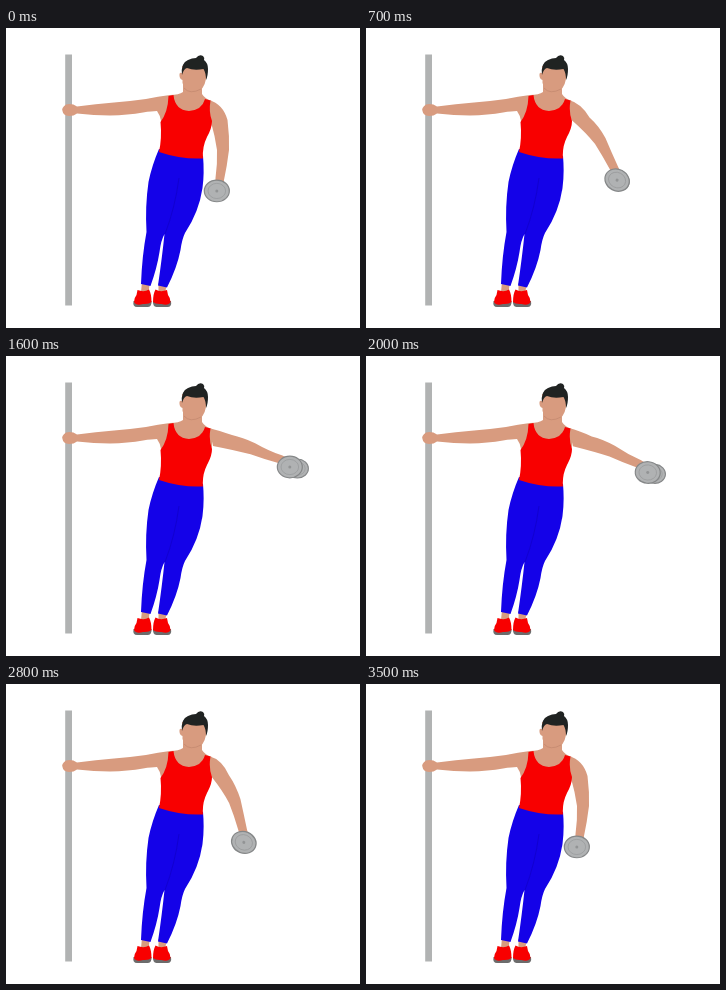
Recreate the animation shown at these times as an HTML page. Size 354 by 300 pixels, loop 3.6 s.

```html
<!DOCTYPE html>
<html lang="en">
<head>
<meta charset="utf-8">
<title>Side raise</title>
<style>
  html, body { margin: 0; width: 100%; height: 100%; overflow: hidden; background: #fff; }
  svg { display: block; width: 354px; height: 300px; }
  .skin { fill: #d89b7f; }
  .red { fill: #f80000; }
  .blue { fill: #1402e8; }
  .hair { fill: #202322; }
  .sole { fill: #6c6c6c; }
  .plate { fill: #b0b2b3; stroke: #858788; stroke-width: 1.2; }
  .ring { fill: none; stroke: #9a9c9d; stroke-width: .8; }
</style>
</head>
<body>
<svg viewBox="0 0 354 300">
  <defs>
    <g id="shoe">
      <path class="sole" d="M127.5 273 Q126.500 279 131 279 H142 Q146 278.500 145.500 273 Z"/>
      <path class="red" d="M131.500 262 Q138 264.500 143 261.500 Q145.500 266 145.500 274 Q143 276.500 137 276 Q130 278 128 274 Q128 270 130.500 267 Z"/>
    </g>
    <g id="disc">
      <ellipse class="plate" rx="12.500" ry="10.800"/>
      <ellipse class="ring" rx="8.800" ry="7.600"/>
    </g>
  </defs>

  <rect x="59.200" y="26.500" width="6.800" height="251" fill="#b1b3b3"/>

  <path id="arm" class="skin"/>

  <!-- holding arm, neck and chest -->
  <path class="skin" d="M164 67 Q152 68.500 140 71 Q124 73 108 74.500 Q90 76 71 78.500
    Q66 75 60 76.500 Q55 80 56.500 83 Q57 87.500 63 88 Q68 88 71 85.500
    Q88 87.500 104 87.500 Q122 87 137 84.500 Q146 83 151 83 Q154 87 155 93
    L165 99 H203 L206 90 L206 73 Q199 71 196 66 V56 H177 V64 Q173 67 164 67 Z"/>
  <path class="skin" d="M176 38 H200 V51 Q198 62 190 65 Q180 66 176.500 55 V52 Q173 51 173.500 46 Q174 44 176 45 Z"/>
  <path d="M178 60 Q184 67 195 61" fill="none" stroke="#c58a70" stroke-width=".8"/>
  <path class="hair" d="M176 47 Q174.500 35 182 32 Q186 30 190 30 Q193 26 197 28 Q199 30 198 32
    Q202 35 202 41 Q202 48 200 52 Q200 45 197.500 41 Q188 43 181 40 Q177.500 41 176 47 Z"/>

  <!-- ankles and shoes -->
  <path class="skin" d="M136 254 H144 L142.500 264 H135 Z M152.500 255 H161 L159 265 H152.500 Z"/>
  <use href="#shoe"/>
  <use href="#shoe" transform="translate(292.500 0) scale(-1 1)"/>

  <path class="blue" d="M153 121 Q146 137 142.500 154 Q139 178 140.500 204 Q136 228 135 256 L144.500 258
    Q151 240 153.500 224 Q155 212 158.500 206 Q156 230 152 257.500 L161 259.500
    Q171 240 174.500 222 Q176 211 179 205 Q193 184 196.500 160 Q198.500 145 197 128 Z"/>
  <path d="M173 150 Q169 180 159 206" fill="none" stroke="#1000c6" stroke-width=".7"/>
  <path class="red" d="M162.500 68 L167.500 67 Q169 82 183 83 Q196 82 199 71 L204.500 72.500
    Q202.500 84 206 93 Q206 100 201 109 Q196 119 197 130.500 Q175 131.500 153 124
    Q156 110 154.500 94 Q162 84 162.500 68 Z"/>

  <g id="bell">
    <use id="back" href="#disc"/>
    <g id="front">
      <use href="#disc"/>
      <circle r="1.500" fill="#929495"/>
    </g>
  </g>
</svg>

<script>
  const LOOP = 3600, STEP = 100;
  const PIVOT = { x: 208, y: 82 };
  const RAD = Math.PI / 180, REST = 2, RAISED = 69.5;
  const get = id => document.getElementById(id);
  const [arm, bell, back, front] = ['arm', 'bell', 'back', 'front'].map(get);
  const mix = (a, b, k) => a + (b - a) * k;
  const ease = p => (1 - Math.cos(Math.PI * Math.min(1, Math.max(0, p)))) / 2;

  // 0 is hanging, 1 is fully raised
  const liftAt = t => t < 1600 ? ease((t - 50) / 1400) : 1 - ease((t - 1740) / 1660);

  function draw(t) {
    const lift = liftAt(t);
    const angle = mix(REST, RAISED, lift) * RAD;
    const swing = angle - REST * RAD;
    const c = Math.cos(swing), s = Math.sin(swing);
    // turns a point of the hanging arm about the shoulder
    const at = (x, y) => {
      const dx = x - PIVOT.x, dy = y - PIVOT.y;
      return `${(PIVOT.x + dx * c + dy * s).toFixed(2)} ${(PIVOT.y - dx * s + dy * c).toFixed(2)}`;
    };
    // the elbow straightens as the arm rises
    const bend = x => x - 4 * lift;
    const capX = mix(217, 213, lift), capY = mix(76, 74.5, lift);
    const outX = mix(221.5, 226, lift), outY = mix(92, 79, lift * lift);
    const pitX = mix(205, 207, lift), pitY = mix(94, 90, lift);

    arm.setAttribute('d', `M203 72 Q${capX} ${capY} ${outX} ${outY}
      Q${at(bend(223.5), 108)} ${at(bend(223), 122)} Q${at(bend(221), 138)} ${at(218, 152)}
      L${at(217, 162)} L${at(209, 162)} L${at(209.5, 150)}
      Q${at(bend(211.5), 135)} ${at(bend(211), 122)} Q${at(bend(209), 108)} ${pitX} ${pitY} Z`);

    const reach = mix(81, 85, lift);
    const x = PIVOT.x + reach * Math.sin(angle);
    const y = PIVOT.y + reach * Math.cos(angle);
    const tilt = 28 * Math.sin(Math.PI * lift);
    const gap = 3.8 * lift * lift;
    const place = (side, size) =>
      `translate(${side * gap} ${side * gap * .2}) rotate(${tilt}) scale(${size})`;
    bell.setAttribute('transform', `translate(${x} ${y})`);
    back.setAttribute('transform', place(1, .88));
    front.setAttribute('transform', place(-1, 1));
  }

  function tick() {
    draw(Math.floor(performance.now() % LOOP / STEP) * STEP);
    requestAnimationFrame(tick);
  }
  tick();
</script>
</body>
</html>
```
